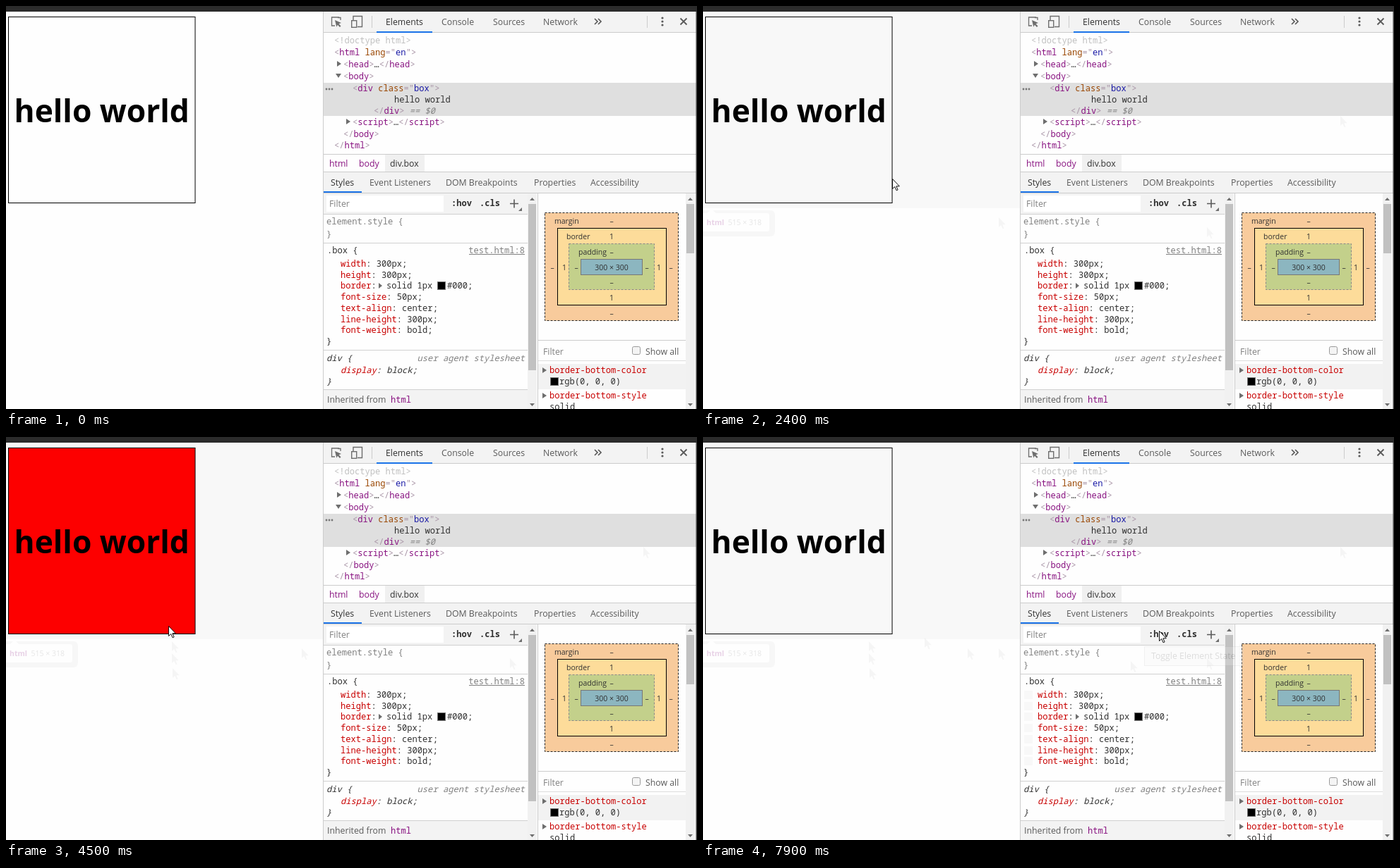
Write an HTML page that moves like this. It is 979 px wide and 572 px high and loops after 8000 ms.

```html
<!DOCTYPE html>
<html lang="en">
<head>
<meta charset="utf-8">
<title>Hover box with inspector</title>
<style>
html, body { margin: 0; width: 100%; height: 100%; overflow: hidden; background: #fefefe; }
svg { display: block; width: 979px; height: 572px; }
text { white-space: pre; font: 12.3px "Open Sans", "Noto Sans", sans-serif; fill: #303030; }
.mono { font: 12.1px "Noto Sans Mono", "DejaVu Sans Mono", monospace; }
.small { font-size: 10.5px; }
.mid { text-anchor: middle; }
.end { text-anchor: end; }
.it { font-style: italic; }
.bold { font-weight: bold; }
.semi { font-weight: 600; }
.tab { fill: #5a5a5a; }
.grey { fill: #808080; }
.pale { fill: #c0c0c0; }
.punct { fill: #a894a6; }
.tag { fill: #881280; }
.attr { fill: #994500; }
.val { fill: #1a1aa6; }
.prop { fill: #c80000; }
.title { font-size: 44.3px; font-weight: bold; fill: #000; }
</style>
</head>
<body>
<svg id="stage" viewBox="0 0 979 572"></svg>
<script>
const LOOP = 8000, STEP = 100;

const text = (x, y, s, cls = '') => `<text x="${x}" y="${y}" class="${cls}">${s}</text>`;
const mono = (x, y, s, cls = '') => text(x, y, s, 'mono ' + cls);
const span = (cls, s) => `<tspan class="${cls}">${s}</tspan>`;
const rect = (x, y, w, h, fill, extra = '') =>
  `<rect x="${x}" y="${y}" width="${w}" height="${h}" fill="${fill}" ${extra}/>`;
const frame = (x, y, w, h, fill, stroke, dash = 0) =>
  rect(x + .5, y + .5, w - 1, h - 1, fill, `stroke="${stroke}" stroke-dasharray="${dash}"`);
const swatch = (x, y) => frame(x, y, 12, 12, '#000', '#777');
const path = (d, fill = '#6e6e6e', extra = '') => `<path d="${d}" fill="${fill}" ${extra}/>`;
const line = (d, colour, width = 1) => path(d, 'none', `stroke="${colour}" stroke-width="${width}"`);
const right = (x, y) => path(`M${x} ${y}v8l6 -4z`);
const down = (x, y, w = 8, h = 6) => path(`M${x} ${y}h${w}l${-w / 2} ${h}z`);

// Markup pieces in the element tree
const open = (name, attr, value) => span('punct', '&lt;') + span('tag', name) +
  (attr ? span('attr', ' ' + attr) + span('punct', '="') + span('val', value) + span('punct', '"') : '') +
  span('punct', '&gt;');
const close = name => span('punct', '&lt;/') + span('tag', name) + span('punct', '&gt;');

const scrollbar = (x, top, thumb) =>
  rect(x, top, 13, 572 - top, '#f1f1f1') + rect(x + 1, top + 15, 11, thumb, '#c1c1c1') +
  path(`M${x + 3} ${top + 10}h7l-3.5 -4z`) + down(x + 3, 564, 7, 4);

const toolbar = () =>
  rect(450, 8, 528, 30, '#f3f3f3') + rect(450, 37, 528, 1, '#ccc') +
  rect(525, 36, 79, 2, '#1a73e8') +
  line('M472 16H461.500V28H466M474 20V16.500H470', '#6e6e6e', 1.3) +
  path('M466 20l9 4l-3.500 1.200l3 3.300l-1.600 1.500l-3 -3.300l-1.600 3z') +
  line('M492 20V14.500H504.500V29.500H498', '#6e6e6e', 1.4) +
  rect(489.7, 20.7, 7, 9.6, '#f3f3f3', 'stroke="#6e6e6e" stroke-width="1.4"') +
  rect(518, 14, 1, 17, '#ccc') + rect(908, 14, 1, 17, '#ccc') +
  text(538, 27, 'Elements') + text(617, 27, 'Console', 'tab') +
  text(690, 27, 'Sources', 'tab') + text(761, 27, 'Network', 'tab') +
  line('M834 18l4 4l-4 4M839 18l4 4l-4 4', '#555', 1.6) +
  [17, 22, 27].map(y => `<circle cx="930" cy="${y}" r="1.6" fill="#5a5a5a"/>`).join('') +
  line('M955.500 17.500l9 9M964.500 17.500l-9 9', '#5a5a5a', 1.8);

const tree = () =>
  rect(450, 109, 528, 47, '#dfdfdf') +
  [454, 458, 462].map(x => `<circle cx="${x}" cy="118" r="1.4" fill="#777"/>`).join('') +
  mono(465, 53, '&lt;!doctype html&gt;', 'pale') +
  mono(465, 70, open('html', 'lang', 'en')) +
  right(469, 78) + mono(478, 87, open('head') + '…' + close('head')) +
  down(467, 96) + mono(478, 104, open('body')) +
  mono(491, 121, open('div', 'class', 'box')) +
  mono(550, 137, 'hello world') +
  mono(521, 153, close('div') + span('grey it', ' == $0')) +
  right(482, 160) + mono(491, 169, open('script') + '…' + close('script')) +
  mono(478, 186, close('body')) + mono(465, 202, close('html')) +
  rect(450, 210, 528, 1, '#ccc') + rect(537, 211, 56, 25, '#f0f0f0') +
  text(458, 228, 'html', 'tag') + text(500, 228, 'body', 'tag') + text(544, 228, 'div.box');

const tabs = () =>
  rect(450, 236, 528, 30, '#f3f3f3') + rect(450, 235, 528, 1, '#ccc') + rect(450, 265, 528, 1, '#ccc') +
  rect(450, 263, 54, 2, '#1a73e8') + text(460, 255, 'Styles') +
  text(515, 255, 'Event Listeners', 'tab') + text(623, 255, 'DOM Breakpoints', 'tab') +
  text(748, 255, 'Properties', 'tab') + text(828, 255, 'Accessibility', 'tab');

const rules = [
  ['width', ' 300px;'], ['height', ' 300px;'], ['border', ''], ['font-size', ' 50px;'],
  ['text-align', ' center;'], ['line-height', ' 300px;'], ['font-weight', ' bold;']
];
const ruleY = i => Math.round(370 + i * 15.7);

const styles = () =>
  rect(450, 266, 289, 30, '#f3f3f3') + rect(454, 269, 166, 23, '#fff') +
  text(458, 285, 'Filter', 'grey') +
  mono(631, 284, ':hov', 'semi') + mono(671, 284, '.cls', 'semi') +
  line('M714 280.500h12M720 274.500v12', '#5a5a5a', 1.6) + path('M731 286v5h-5z') +
  [295, 336, 488, 544].map(y => rect(450, y, 289, 1, '#d0d0d0')).join('') +
  mono(454, 310, 'element.style {', 'grey') + mono(454, 328, '}', 'grey') +
  mono(455, 351, '.box {') + mono(735, 351, 'test.html:8', 'grey end') + rect(656, 352, 79, 1, '#808080') +
  rules.map(([name, value], i) => mono(474, ruleY(i), span('prop', name) + ':' + value)).join('') +
  path('M528 393v8l5 -4z') + mono(539, 401, 'solid 1px') +
  swatch(611, 391) + mono(625, 401, '#000;') + mono(454, 480, '}') +
  mono(454, 504, 'div {', 'it') + mono(735, 504, 'user agent stylesheet', 'grey it end') +
  mono(474, 521, span('prop', 'display') + ': block;', 'it') + mono(454, 537, '}', 'it') +
  rect(450, 545, 289, 27, '#f3f3f3') + text(455, 563, 'Inherited from', 'tab') + mono(545, 563, 'html', 'tag') +
  scrollbar(739, 266, 236) + rect(753, 266, 1, 306, '#ccc');

const boxModel = () => {
  const label = (x, y, s) => text(x, y, s, 'small');
  const mark = (x, y, s) => text(x, y, s, 'small mid');
  return frame(763, 293, 190, 154, '#f8cb9c', '#222', '3 2') +
    frame(781, 315, 155, 110, '#fddc9a', '#000') +
    frame(797, 337, 122, 66, '#c3d08b', '#888', '3 2') +
    frame(814, 359, 88, 23, '#8cb6c0', '#777') +
    label(777, 309, 'margin') + label(794, 331, 'border') + label(811, 353, 'padding') +
    [[309, '–'], [331, '1'], [353, '–'], [375, '300 × 300'], [396, '–'], [418, '1'], [440, '–']]
      .map(([y, s]) => mark(858, y, s)).join('') +
    [-84, -67, -50, 50, 67, 84].map(dx => mark(858 + dx, 375, Math.abs(dx) === 67 ? '1' : '–')).join('');
};

const computed = () =>
  rect(754, 474, 209, 1, '#ccc') + rect(754, 503, 209, 1, '#ddd') +
  text(761, 495, 'Filter', 'grey') +
  rect(887.5, 483.5, 11, 11, '#f4f4f4', 'rx="2" stroke="#999"') + text(906, 495, 'Show all', 'tab') +
  rect(754, 508, 209, 36, '#f2f2f2') +
  right(760, 513) + mono(770, 521, 'border-bottom-color', 'prop') +
  swatch(771, 527) + mono(784, 537, 'rgb(0, 0, 0)') +
  right(760, 549) + mono(770, 557, 'border-bottom-style', 'prop') + mono(770, 573, 'solid') +
  scrollbar(963, 266, 70);

const arrow = 'M0 0V14L3.200 11L5.600 16.300L7.600 15.400L5.300 10.300H9.800Z';

// Faint traces left behind: [visible from, x, y]
const traces = [
  [800, 903, 156], [1200, 714, 314], [1600, 419, 300], [3500, 235, 290], [3500, 235, 307],
  [4300, 236, 328], [5900, 314, 285], [6100, 375, 300], [7100, 606, 318]
];

const ruleHover = colour =>
  rules.map((_, i) => rect(455.5, ruleY(i) - 9.5, 10, 10, '#f4f4f4', `rx="1" stroke="${colour}"`) +
    line(`M458 ${ruleY(i) - 5}l2.500 2.500l4 -5`, colour, 1.5)).join('') +
  [470, 474, 478].map(y => `<circle cx="720" cy="${y}" r="1.200" fill="${colour}"/>`).join('');

const sizeTip = () =>
  rect(-4, 290, 106, 37, '#ddd', 'rx="6"') + path('M5 295l7 -7l7 7z', '#fff') +
  rect(-2, 294, 96, 26, '#fff', 'rx="3"') +
  text(5, 311, span('tag bold', 'html') + span('grey', '  515 × 318'), 'small');

const stage = document.getElementById('stage');
stage.innerHTML =
  rect(0, 0, 979, 572, '#fefefe') +
  rect(0, 8, 449, 279, '#f8f8f8', 'id="wash"') +
  `<g id="tip">${sizeTip()}</g>` +
  `<g id="box">${frame(3, 15, 265.5, 265, 'inherit', '#000').replace('fill="inherit"', '')}</g>` +
  text(135.7, 165, 'hello world', 'title mid') +
  rect(0, 8, 449, 279, '#6fa8dc', 'id="highlight" opacity=".66"') +
  rect(449, 8, 1, 564, '#ccc') +
  toolbar() + tree() + tabs() + styles() + boxModel() + computed() +
  rect(0, 0, 979, 8, '#2b2b2b') + rect(977.5, 8, 1.5, 564, '#444') +
  traces.map(([, x, y]) => path(arrow, '#000', `class="trace" opacity=".035" transform="translate(${x} ${y})"`)).join('') +
  `<g id="hover">${ruleHover('#777')}</g><g id="hoverTrace" opacity=".5">${
    rules.map((_, i) => rect(455, ruleY(i) - 10, 12, 12, '#f3f3f3')).join('')}</g>` +
  `<g id="hint">${frame(625, 297, 141, 28, '#f4f4f4', '#bbb')}${text(635, 315, 'Toggle Element State', 'tab')}</g>` +
  path(arrow, '#fff', 'id="cursor" stroke="#111"');

// Pointer runs: start time, then one position per step
const runs = [
  [700, [903, 156], [778, 285], [772, 285]],
  [1100, [714, 314], [540, 304], [478, 299]],
  [1500, [419, 300], [352, 267]],
  [1800, [325, 263], [304, 260], [296, 259]],
  [2300, [288, 254], [268, 245], [238, 238], [224, 241], [219, 246]],
  [3100, [228, 264], [236, 281], [239, 291], [236, 308], [236, 327]],
  [4200, [236, 322], [235, 307], [234, 288], [230, 268], [227, 255], [225, 248]],
  [5200, [236, 250], [260, 255], [279, 258], [298, 270], [312, 279], [317, 281]],
  [6000, [375, 300], [440, 326], [474, 338]],
  [6400, [500, 345], [535, 351], [549, 352]],
  [6800, [575, 340], [606, 318], [630, 292], [641, 279], [645, 272], [646, 275]]
];

function pointerAt(t) {
  const run = runs.filter(r => r[0] <= t).pop();
  return run && run[Math.min(Math.floor((t - run[0]) / STEP) + 1, run.length - 1)];
}

const between = (t, from, to) => t >= from && t < to;
const el = id => document.getElementById(id);
const show = (node, on) => { node.style.visibility = on ? 'visible' : 'hidden'; };
const traceNodes = [...document.querySelectorAll('.trace')];

function hintOpacity(t) {
  if (t < 7500) return 0;
  if (t >= 7900) return .2;
  return Math.min(1, (Math.floor((t - 7500) / STEP) + 1) / 3);
}

function draw(t) {
  const pos = pointerAt(t);
  show(el('cursor'), pos);
  if (pos) el('cursor').setAttribute('transform', `translate(${pos[0] + .5} ${pos[1] + .5})`);
  const red = between(t, 2500, 3200) || between(t, 4500, 5400);
  el('box').setAttribute('fill', red ? '#fd0000' : 'none');
  show(el('wash'), t >= 800);
  show(el('highlight'), between(t, 700, 800));
  show(el('tip'), t >= 700);
  el('tip').setAttribute('opacity', t < 800 ? 1 : .18);
  show(el('hover'), between(t, 6200, 6900));
  show(el('hoverTrace'), t >= 6900);
  el('hint').setAttribute('opacity', hintOpacity(t));
  traceNodes.forEach((node, i) => show(node, t >= traces[i][0]));
}

const start = performance.now();
function tick() {
  draw((performance.now() - start) % LOOP);
  requestAnimationFrame(tick);
}
tick();
</script>
</body>
</html>
```
